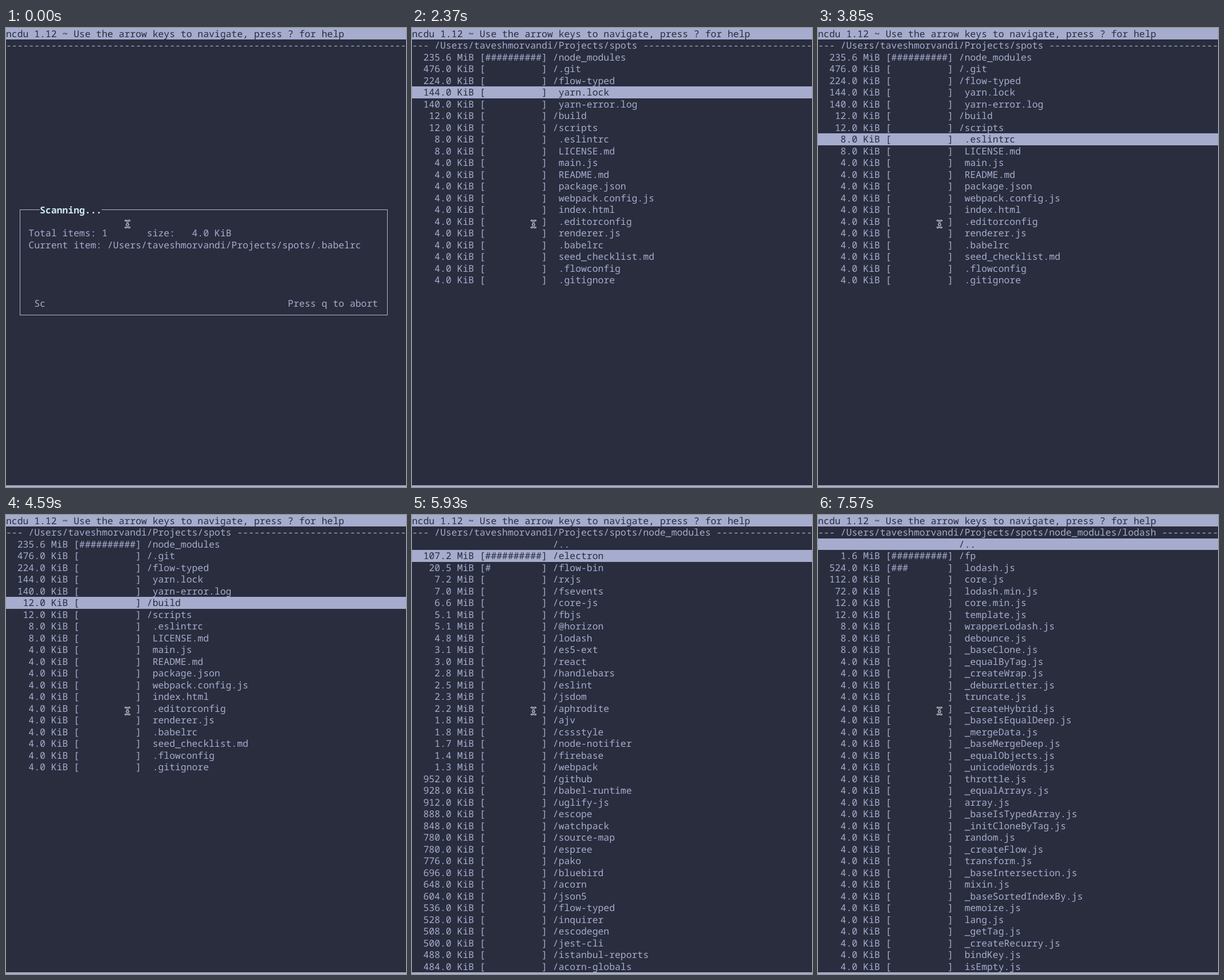
An HTML page that plays this animation: 698 by 802 pixels, repeating every 8000 ms.

```html
<!DOCTYPE html>
<html lang="en">
<head>
<meta charset="utf-8">
<title>ncdu</title>
<style>
  :root { --bg: #292d3e; --fg: #a6accd; }
  html, body { margin: 0; width: 100%; height: 100%; overflow: hidden; background: var(--bg); }
  #stage {
    position: relative; width: 698px; height: 802px; overflow: hidden;
    background: var(--bg); color: var(--fg);
    font: 16.4px/20.5px "Noto Sans Mono", "DejaVu Sans Mono", monospace;
    text-rendering: geometricPrecision; font-variant-ligatures: none;
  }
  .row { position: absolute; left: 0; width: 698px; height: 20.5px; white-space: pre; overflow: hidden; }
  .inverse { background: var(--fg); color: var(--bg); }
  #dialog { position: absolute; left: 24px; top: 317px; width: 640px; height: 183px; border: 1px solid #aeb5cb; }
  #title {
    position: absolute; left: 34px; top: -10px; width: 108px;
    background: var(--bg); color: #cfe6f0; font-weight: 700;
  }
  #footer { position: absolute; left: 0; top: 799px; width: 698px; height: 3px; background: var(--fg); }
  #pointer { position: absolute; left: 206px; top: 334px; }
</style>
</head>
<body>
<div id="stage">
  <div id="rows"></div>
  <div id="dialog"><div id="title">Scanning...</div></div>
  <div id="footer"></div>
  <svg id="pointer" width="12" height="17" fill="none" stroke-linecap="round">
    <path id="beam" d="M2.5 2.5Q5.5 2.5 6 4.5Q6.5 2.5 9.5 2.5M6 4.5V12.5M2.5 14.5Q5.5 14.5 6 12.5Q6.5 14.5 9.5 14.5M4.5 9.5H7.5" stroke="#e4e6ec" stroke-width="2.6"/>
    <use href="#beam"/>
    <path d="M2.5 2.5Q5.5 2.5 6 4.5Q6.5 2.5 9.5 2.5M6 4.5V12.5M2.5 14.5Q5.5 14.5 6 12.5Q6.5 14.5 9.5 14.5M4.5 9.5H7.5" stroke="#15171f" stroke-width="1"/>
  </svg>
</div>
<script>
const LOOP = 8000, ROW = 20.5, COLS = 71;
const HOME = '/Users/taveshmorvandi/Projects/spots';

// Each entry: size, unit, then "/folder" or " file".
const parse = text => text.trim().split('\n').map(line => {
  const [, size, unit, name] = line.match(/^([\d.]+)([KM])(.*)$/);
  return { size, unit, name, kib: size * (unit === 'M' ? 1024 : 1) };
});
const smallFiles = names => names.split(' ').map(name => '4.0K ' + name).join('\n');

const project = parse(`
235.6M/node_modules
476.0K/.git
224.0K/flow-typed
144.0K yarn.lock
140.0K yarn-error.log
12.0K/build
12.0K/scripts
8.0K .eslintrc
8.0K LICENSE.md
` + smallFiles('main.js README.md package.json webpack.config.js index.html .editorconfig ' +
  'renderer.js .babelrc seed_checklist.md .flowconfig .gitignore'));

const modules = parse(`
107.2M/electron
20.5M/flow-bin
7.2M/rxjs
7.0M/fsevents
6.6M/core-js
5.1M/fbjs
5.1M/@horizon
4.8M/lodash
3.1M/es5-ext
3.0M/react
2.8M/handlebars
2.5M/eslint
2.3M/jsdom
2.2M/aphrodite
1.8M/ajv
1.8M/cssstyle
1.7M/node-notifier
1.4M/firebase
1.3M/webpack
952.0K/github
928.0K/babel-runtime
912.0K/uglify-js
888.0K/escope
848.0K/watchpack
780.0K/source-map
780.0K/espree
776.0K/pako
696.0K/bluebird
648.0K/acorn
604.0K/json5
536.0K/flow-typed
528.0K/inquirer
508.0K/escodegen
500.0K/jest-cli
488.0K/istanbul-reports
484.0K/acorn-globals`);

const lodash = parse(`
1.6M/fp
524.0K lodash.js
112.0K core.js
72.0K lodash.min.js
12.0K core.min.js
12.0K template.js
8.0K wrapperLodash.js
8.0K debounce.js
8.0K _baseClone.js
` + smallFiles('_equalByTag.js _createWrap.js _deburrLetter.js truncate.js _createHybrid.js ' +
  '_baseIsEqualDeep.js _mergeData.js _baseMergeDeep.js _equalObjects.js _unicodeWords.js ' +
  'throttle.js _equalArrays.js array.js _baseIsTypedArray.js _initCloneByTag.js random.js ' +
  '_createFlow.js transform.js _baseIntersection.js mixin.js _baseSortedIndexBy.js memoize.js ' +
  'lang.js _getTag.js _createRecurry.js bindKey.js isEmpty.js'));

// Scan steps: time, letters shown, items, size, current path.
const scans = [
  [0, 2, 1, '4.0 KiB', '/.babelrc'],
  [150, 4, 2146, '14.2 MiB', '/node_modules/babel-runtime/core-js/map.js'],
  [300, 5, 5372, '31.8 MiB', '/node_modules/core-js/library/fn/set.js'],
  [440, 6, 8619, '148.5 MiB', '/node_modules/es5-ext/array/from/index.js'],
  [590, 8, 12204, '183.9 MiB', '/node_modules/handlebars/lib/index.js'],
  [740, 9, 15831, '203.7 MiB', '/node_modules/lodash/fp/flatMapDepth.js'],
  [880, 11, 19467, '224.1 MiB', '/node_modules/rxjs/operator/mergeMap.js'],
];

const views = {
  project: { path: HOME, items: project },
  modules: { path: HOME + '/node_modules', items: modules, nested: true },
  lodash: { path: HOME + '/node_modules/lodash', items: lodash, nested: true },
};

// Browse steps: view, start time, selected index at each key press.
const moves = [
  ['project', 1030, [0]],
  ['project', 2070, [1, 2, 3, 2, 1]],
  ['project', 2970, [2, 3, 4, 5]],
  ['project', 3700, [6, 7, 8, 7]],
  ['project', 4440, [6, 5, 4, 3, 2, 1, 0]],
  ['modules', 5480, [0]],
  ['modules', 5930, [1, 2, 3]],
  ['modules', 6530, [4, 5, 6, 7, 8]],
  ['lodash', 7570, [0]],
];
// Key repeats land on a 10 ms grid.
const repeatTime = (start, i) => start + Math.floor(i * 14.85 + 0.2) * 10;

const steps = [
  ...scans.map(scan => ({ time: scan[0], scan })),
  ...moves.flatMap(([view, start, picks]) =>
    picks.map((pick, i) => ({ time: repeatTime(start, i), view, pick }))),
];

const rows = document.getElementById('rows');
const dialog = document.getElementById('dialog');

function put(row, text, inverse) {
  const line = document.createElement('div');
  line.className = inverse ? 'row inverse' : 'row';
  line.style.top = row * ROW - 0.5 + 'px';
  line.textContent = text;
  rows.append(line);
}

const crop = path => path.length <= 48 ? path : path.slice(0, 21) + '...' + path.slice(-24);

function drawScan([, letters, count, size, path]) {
  const [value, unit] = size.split(' ');
  put(1, '-'.repeat(COLS));
  put(17, `    Total items: ${String(count).padEnd(8)}size: ${value.padStart(5)} ${unit}`);
  put(18, '    Current item: ' + crop(HOME + path));
  put(23, ('     ' + 'Scanning...'.slice(0, letters)).padEnd(50) + 'Press q to abort');
}

function drawList({ path, items, nested }, pick) {
  const largest = items[0].kib;
  const lines = items.map(({ size, unit, name, kib }) => {
    const bar = '#'.repeat(Math.floor(10 * kib / largest)).padEnd(10);
    return `${size.padStart(7)} ${unit}iB [${bar}] ${name}`;
  });
  if (nested) lines.unshift(' '.repeat(25) + '/..');
  put(1, `--- ${path} `.padEnd(COLS, '-'));
  lines.slice(0, 37).forEach((text, i) => put(i + 2, text, i === pick));
}

let shown;
function render(now) {
  const time = now % LOOP;
  const step = steps.findLast(s => s.time <= time);
  if (step !== shown) {
    shown = step;
    rows.replaceChildren();
    put(0, 'ncdu 1.12 ~ Use the arrow keys to navigate, press ? for help', true);
    dialog.style.display = step.scan ? '' : 'none';
    if (step.scan) drawScan(step.scan);
    else drawList(views[step.view], step.pick);
  }
}

const start = performance.now();
function tick() {
  render(performance.now() - start);
  requestAnimationFrame(tick);
}
tick();
</script>
</body>
</html>
```
